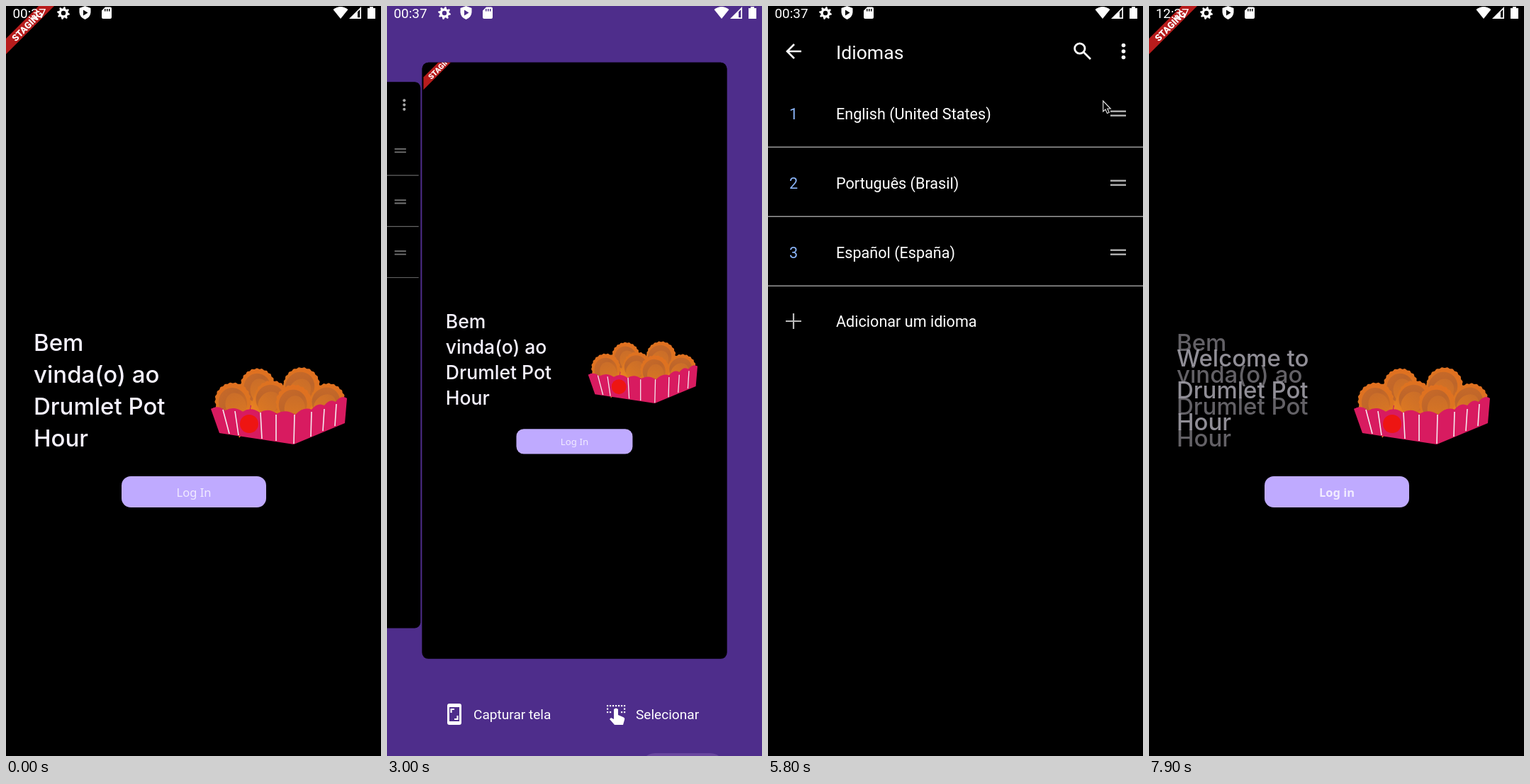
An HTML page with a canvas for the animation above (8 s loop, 529 by 1059 pixels).

```html
<!DOCTYPE html>
<html lang="pt">
<head>
<meta charset="utf-8">
<style>
html, body { margin: 0; width: 100%; height: 100%; overflow: hidden; background: #000; }
canvas { display: block; width: 100%; height: 100%; }
</style>
</head>
<body>
<canvas id="stage" width="529" height="1059"></canvas>
<script>
const W = 529, H = 1059, LOOP = 8000, STATUS_H = 24;
const CARD_SCALE = 0.8135, SIDE_SCALE = 0.745;
const LANGUAGE_AT = 6000;
const ctx = document.getElementById('stage').getContext('2d');

const clamp = v => Math.max(0, Math.min(1, v));
const smooth = v => (1 - Math.cos(Math.PI * clamp(v))) / 2;
const mix = (a, b, k) => a + (b - a) * k;

// Eased value at time t along [time, value] keys.
function track(t, keys) {
  if (t <= keys[0][0]) return keys[0][1];
  for (let i = 1; i < keys.length; i++) {
    const [t0, a] = keys[i - 1], [t1, b] = keys[i];
    if (t <= t1) return mix(a, b, smooth((t - t0) / (t1 - t0)));
  }
  return keys[keys.length - 1][1];
}

function group(drawing) {
  ctx.save();
  drawing();
  ctx.restore();
}

function text(str, x, y, size, color = '#fff', family = 'Roboto', weight = 400) {
  ctx.font = `${weight} ${size}px ${family}, sans-serif`;
  ctx.fillStyle = color;
  ctx.fillText(str, x, y);
}

function fillRect(x, y, w, h, color, radius = 0) {
  ctx.fillStyle = color;
  ctx.beginPath();
  ctx.roundRect(x, y, w, h, radius);
  ctx.fill();
}

function fillPath(d, color) {
  ctx.fillStyle = color;
  ctx.fill(new Path2D(d), 'evenodd');
}

function strokePath(d, color, width) {
  ctx.strokeStyle = color;
  ctx.lineWidth = width;
  ctx.stroke(new Path2D(d));
}

function dot(x, y, r, color) {
  ctx.fillStyle = color;
  ctx.beginPath();
  ctx.arc(x, y, r, 0, 7);
  ctx.fill();
}

function gradient(x0, y0, x1, y1, ...colors) {
  const fill = ctx.createLinearGradient(x0, y0, x1, y1);
  colors.forEach((color, i) => fill.addColorStop(i / (colors.length - 1), color));
  return fill;
}

// ---- Welcome screen ----

function drumstick(x, y, r, angle) {
  group(() => {
    ctx.translate(x, y);
    ctx.rotate(angle);
    ctx.beginPath();
    for (let a = 0.88 * Math.PI; a <= 2.12 * Math.PI; a += 0.03) {
      const edge = r + 0.6 * Math.sin(a * 21);
      ctx.lineTo(Math.cos(a) * edge, Math.sin(a) * edge);
    }
    ctx.quadraticCurveTo(r * 0.75, 22, 7, 40);
    ctx.lineTo(9, 52);
    ctx.lineTo(1, 48);
    ctx.lineTo(-7, 53);
    ctx.lineTo(-6, 40);
    ctx.quadraticCurveTo(-r * 0.75, 22, -r * 0.93, r * 0.37);
    ctx.closePath();
    ctx.fillStyle = gradient(0, -r, 0, 50, '#e07020', '#db7521', '#f99424');
    ctx.fill();

    ctx.fillStyle = gradient(-r, -r, r, r, '#cd6c28', '#bd652a', '#d87321');
    ctx.beginPath();
    ctx.ellipse(-1, 3, r * 0.8, r * 0.85, 0, 0, 7);
    ctx.fill();
    ctx.fillStyle = gradient(0, -r / 2, 0, r, '#c96d29', '#da7723');
    ctx.beginPath();
    ctx.ellipse(2, 8, r * 0.58, r * 0.72, 0, 0, 7);
    ctx.fill();
  });
}

function scallops(xs, y0, y1) {
  const first = xs[0], span = xs[xs.length - 1] - first;
  const yAt = x => mix(y0, y1, (x - first) / span);
  for (let i = 1; i < xs.length; i++) {
    const mid = (xs[i - 1] + xs[i]) / 2;
    ctx.quadraticCurveTo(mid, yAt(mid) - 8, xs[i], yAt(xs[i]));
  }
}

function snackBox(t) {
  const lift = track(t, [[300, 0], [1200, 1], [2400, 0]]);
  const hop = track(t, [[850, 0], [1200, 1], [1550, 0]]);
  fillPath('M289 569L345 547L430 544L481 554L408 580Z', '#c2185b');
  drumstick(355 - 6 * lift, 536 - 68 * lift, 24, -0.2 - 0.33 * lift);
  drumstick(417, 536 - 72 * lift, 25.5, 0.6 + 0.53 * lift);
  drumstick(320, 557 - 9 * hop, 25, -0.3);
  drumstick(454, 557 - 9 * hop, 24, 0.8);
  drumstick(375, 553 - 2 * lift, 24, 0.75 - 0.12 * lift);
  drumstick(406, 560, 25, 0.1 + 0.08 * lift);

  ctx.fillStyle = '#d81b60';
  ctx.beginPath();
  ctx.moveTo(289, 569);
  scallops([289, 309, 334, 358, 382, 408], 570, 577);
  scallops([408, 431, 449, 465, 481], 577, 554);
  ctx.lineTo(478, 589);
  ctx.lineTo(406, 619);
  ctx.lineTo(301, 603);
  ctx.fill();
  strokePath('M306 570L315 604M323 572L328 606M359 574L361 611M381 577L381 614' +
    'M407 577L406 618M431 573L430 608M449 569L447 600M466 562L464 593', '#f6eaf0', 1.6);
  dot(343, 590, 13, '#ee1512');
}

function greeting(lines, baseline, color) {
  lines.forEach((line, i) => text(line, 39, baseline + 45 * i, 33, color, 'Inter', 500));
}

function welcomeScreen(t) {
  fillRect(0, 0, W, H, '#000');
  const changing = t >= 7850;
  const local = ['Bem', 'vinda(o) ao', 'Drumlet Pot', 'Hour'];
  greeting(local, 487, changing ? '#636166' : '#f6f2ff');
  if (changing) greeting(['Welcome to', ...local.slice(2)], 509, 'rgba(160,157,166,.9)');
  snackBox(t);
  fillRect(163, 664, 204, 44, '#bfaaff', 13);
  ctx.textAlign = 'center';
  text(changing ? 'Log in' : 'Log In', 265, 693, 16.5, '#f1ebff', 'Noto Sans', changing ? 600 : 400);
  fillPath('M46 0H68L0 68V46Z', '#b71c1c');
  group(() => {
    ctx.translate(30, 28);
    ctx.rotate(-Math.PI / 4);
    text('STAGING', 0, 4.6, 13, '#fff', 'Roboto', 900);
  });
  ctx.textAlign = 'left';
}

// ---- Language settings ----

function languageRow(number, name, y) {
  fillRect(0, y - 47, W, 96, '#000');
  text(number, 30, y + 8, 21.6, '#8ab4f8');
  text(name, 96, y + 8, 21.6);
  fillRect(483, y - 4.5, 22, 2.4, '#b4b4b4');
  fillRect(483, y + 1.5, 22, 2.4, '#b4b4b4');
  fillRect(0, y + 46.5, W, 1.6, '#999');
}

function settingsScreen(t) {
  const english = t >= LANGUAGE_AT, dropped = t >= 5400;
  const drag = track(t, [[4600, 0], [5400, 1]]);
  const makeRoom = track(t, [[4950, 0], [5200, 1]]);
  fillRect(0, 0, W, H, '#000');
  strokePath('M47 64H27M37 54L27 64L37 74', '#fff', 2.6);
  text(english ? 'Languages' : 'Idiomas', 96, 75, 26.6);
  strokePath('M447 60A7.2 7.2 0 1 1 432.6 60A7.2 7.2 0 1 1 447 60M445 65L455 75', '#fff', 2.8);
  for (const y of [55.5, 64, 72.5]) dot(501.5, y, 2.8, '#fff');
  languageRow(3, 'Español (España)', 348);
  languageRow(dropped ? 2 : 1, 'Português (Brasil)', 152 + 98 * makeRoom);
  languageRow(dropped ? 1 : 2, 'English (United States)', 250 - 98 * drag);
  strokePath('M25 445H47M36 434V456', '#bbb', 2.2);
  text(english ? 'Add a language' : 'Adicionar um idioma', 96, 453, 21.6);
}

function cursor(t) {
  if (t < 3500 || t >= 7150) return;
  group(() => {
    ctx.translate(
      track(t, [[3500, 430], [3800, 463], [4300, 474], [5400, 476], [5800, 472], [6400, 300]]),
      track(t, [[3500, 300], [3800, 224], [4300, 232], [4600, 232], [5400, 136], [5800, 133], [6400, 956]]));
    const arrow = 'M.7 1V16L4 13L6.5 18.5L9.3 17.2L6.8 12H11.2Z';
    fillPath(arrow, '#000');
    strokePath(arrow, '#ddd', 1.2);
  });
}

// ---- App switcher ----

function card(screen, t, slot, zoom, rise) {
  const open = clamp((1 - zoom) / (1 - CARD_SCALE)), side = Math.min(1, Math.abs(slot));
  const scale = mix(zoom, SIDE_SCALE, side);
  const spacing = (zoom + SIDE_SCALE) * W / 2 + 2;
  group(() => {
    ctx.translate(W / 2 + slot * spacing, H / 2 - rise - 7 * side);
    ctx.scale(scale, scale);
    ctx.translate(-W / 2, -H / 2);
    ctx.beginPath();
    ctx.roundRect(0, STATUS_H * open, W, H - STATUS_H * open, 11 * open);
    ctx.fillStyle = '#000';
    ctx.fill();
    ctx.clip();
    ctx.translate(2.6 * open, 4 * open);
    ctx.scale(1 - 0.012 * open, 1 - 0.012 * open);
    screen(t);
    fillRect(0, 0, W, H, `rgba(0,0,0,${0.35 * side * open})`);
  });
}

function screenshotIcon(x) {
  group(() => {
    ctx.translate(x, 1000);
    fillPath('M-7 -15H7Q10 -15 10 -12V12Q10 15 7 15H-7Q-10 15 -10 12V-12Q-10 -15 -7 -15Z' +
      'M-7 -10V10H7V-10Z', '#fff');
    strokePath('M-4.5 -2V-7H0M4.5 2V7H0', '#fff', 2.2);
  });
}

function selectIcon(x) {
  group(() => {
    ctx.translate(x, 1000);
    for (let i = 0; i < 7; i++) {
      fillRect(-13 + i * 4, -13, 2.2, 2.2, '#fff');
      if (i < 2 || i > 4) fillRect(-13 + i * 4, -4, 2.2, 2.2, '#fff');
    }
    fillRect(-13, -8.5, 2.2, 2.2, '#fff');
    fillRect(11, -8.5, 2.2, 2.2, '#fff');
    fillPath('M-3 -7Q0 -10 3 -7V1L10 4Q13 5 12 8L10 15H-2L-9 7L-7 5L-3 7Z', '#fff');
  });
}

function switcher(t, front, back, zoom, rise, slide) {
  const english = t >= LANGUAGE_AT;
  fillRect(0, 0, W, H, '#4e2d8b');
  group(() => {
    ctx.globalAlpha = clamp((1 - zoom) / 0.12);
    screenshotIcon(english ? 102 : 95);
    selectIcon(english ? 342 : 323);
    text(english ? 'Screenshot' : 'Capturar tela', english ? 129 : 122, 1007, 19.1);
    text(english ? 'Select' : 'Selecionar', english ? 369 : 351, 1007, 19.1);
    fillRect(358, 1055, 118, 40, '#6a479f', 20);
  });
  card(back, t, slide - 1, zoom, rise);
  card(front, t, slide, zoom, rise);
}

function statusBar(t) {
  text(t >= LANGUAGE_AT ? '12:37' : '00:37', 9.5, 17, 18.9);
  ctx.fillStyle = '#fff';
  ctx.beginPath();
  for (let i = 0; i < 32; i++) {
    const a = (i + 0.5) * Math.PI / 16, r = i % 4 < 2 ? 9 : 6.6;
    ctx.lineTo(81 + r * Math.cos(a), 10 + r * Math.sin(a));
  }
  ctx.closePath();
  ctx.moveTo(84.2, 10);
  ctx.arc(81, 10, 3.2, 0, 7);
  ctx.fill('evenodd');
  fillPath('M111.5 0L119.5 3V9Q119 16 111.5 19Q104 16 103.5 9V3ZM109 5.5V13.5L115.5 9.5Z', '#fff');
  fillPath('M140 1.5H147Q149 1.5 149 3.5V16Q149 18 147 18H137Q135 18 135 16V6.5Z' +
    'M139 4V7.5H140.5V4ZM142 4V7.5H143.5V4ZM145 4V7.5H146.5V4Z', '#fff');
  fillPath('M461.5 5Q472 -3 482.5 5L472 18Z', '#fff');
  fillPath('M484 18L501 1V18ZM496 8.2V16.3H499.3V5Z', '#fff');
  fillPath('M513 1H518V3H521V18H510V3H513Z', '#fff');
}

function draw(t) {
  if (t > 2500 && t < 3500) {
    switcher(t, welcomeScreen, settingsScreen,
      track(t, [[2500, 1], [2950, CARD_SCALE], [3150, CARD_SCALE], [3500, 1]]),
      track(t, [[2500, 0], [2950, 38.5], [3150, 38.5], [3500, 0]]),
      track(t, [[3000, 0], [3250, 1]]));
  } else if (t > 7100 && t < 7700) {
    switcher(t, settingsScreen, welcomeScreen,
      track(t, [[7100, 1], [7400, 0.776], [7700, 1]]),
      track(t, [[7100, 0], [7400, 43], [7700, 0]]),
      track(t, [[7410, 0], [7600, 1]]));
  } else {
    (t >= 3500 && t <= 7100 ? settingsScreen : welcomeScreen)(t);
  }
  statusBar(t);
  cursor(t);
}

const start = performance.now();
function tick() {
  draw((performance.now() - start) % LOOP);
  requestAnimationFrame(tick);
}
tick();
</script>
</body>
</html>
```
